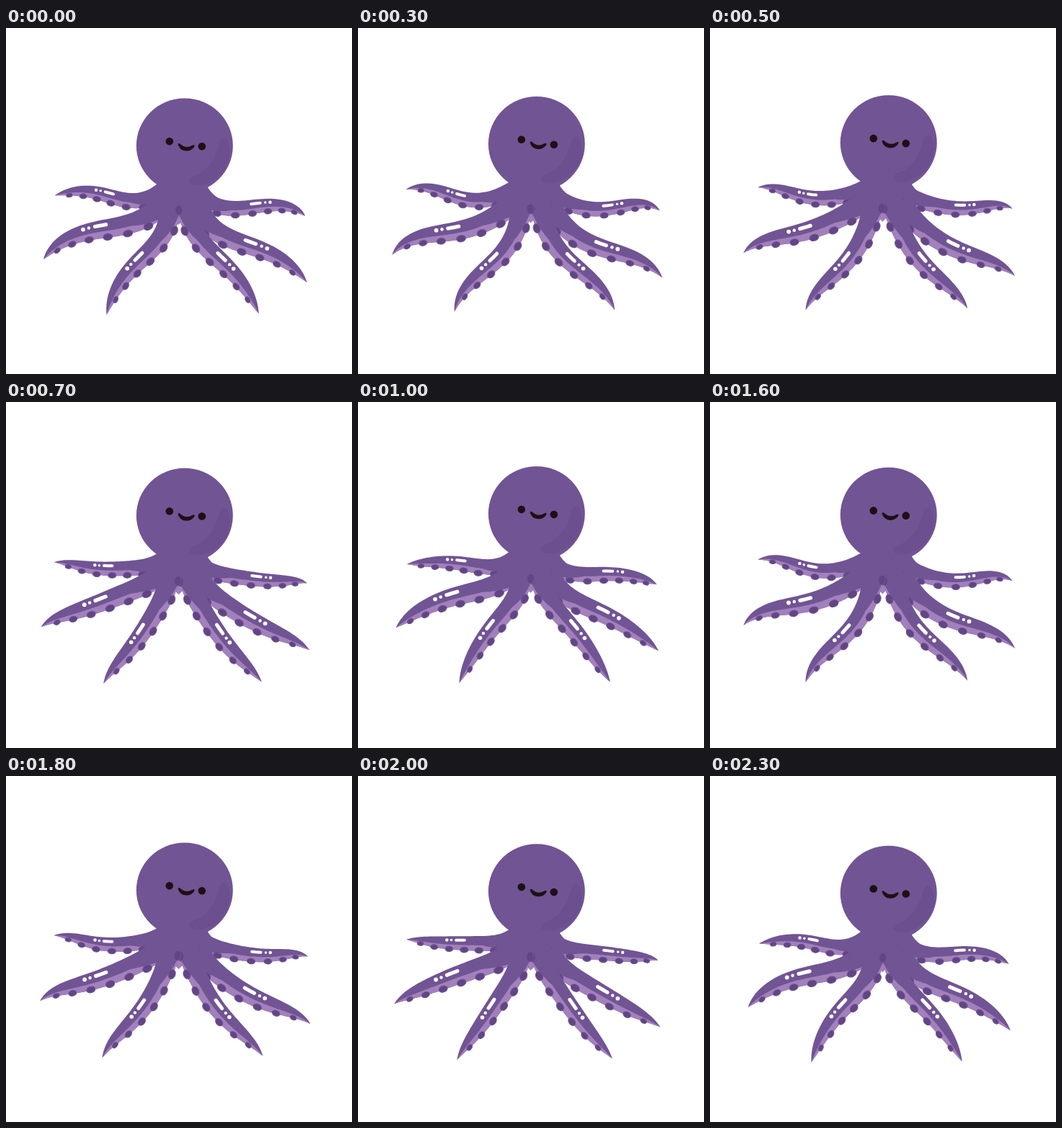
An HTML page that plays this animation: 480x480 px, repeating every 2400 ms.

```html
<!DOCTYPE html>
<html lang="en">
<head>
<meta charset="utf-8">
<title>Octopus</title>
<style>
  html, body { margin: 0; width: 100%; height: 100%; overflow: hidden; background: #fff; }
  svg { display: block; width: 100vw; height: 100vh; }
</style>
</head>
<body>
<svg viewBox="0 0 480 480">
  <g id="octopus">
    <path fill="#715494" d="M212 214Q204 228 188 231L212 260L240 244L268 262L304 240Q286 235 276 214Z"/>
    <path fill="#a280bb" d="M239.5 240L228 262L239.5 273L251 262Z"/>
    <g id="arms"></g>
    <ellipse cx="247.8" cy="163.3" rx="67" ry="65.8" fill="#715494"/>
    <path fill="#6b4f8e" d="M297 157Q302 150 306 155Q315 168 307 189Q296 212 270 218Q254 219 254 211Q256 206 269 202Q286 190 292 172Q295 166 297 157Z"/>
    <g fill="#1d1015">
      <circle cx="226.8" cy="157.3" r="5.3"/>
      <circle cx="271.8" cy="164.3" r="5.3"/>
      <path d="M238.5 161.5Q239.5 158.8 242 161Q249.5 168 258.5 162.8Q261.5 161 261.7 164Q257.5 171 249.5 170.6Q241 169.8 238.5 161.5Z"/>
    </g>
  </g>
</svg>
<script>
const LOOP = 2400, STEP = 100, WAVE = 1200;
const DARK = '#715494', LIGHT = '#a280bb', SUCKER = '#614584';

// Resting centre line at 0, 1/3, 2/3 and 1 of the length; back to front.
const arms = [
  { side: 1, width: 10, line: [[218, 225], [167, 238.5], [116, 231], [67, 229.3]] },
  { side: -1, width: 10, line: [[266, 230], [319, 250], [374.5, 249.5], [417, 258.3]] },
  { side: 1, width: 13, line: [[221, 238.5], [165, 273], [100, 291], [49.5, 319]] },
  { side: -1, width: 12.7, line: [[265, 243.5], [307, 290], [368, 318], [420, 351]] },
  { side: -1, width: 12.4, line: [[253, 240], [273.5, 298.5], [316, 347], [353.5, 395]] },
  { side: 1, width: 12.4, line: [[226, 240], [208.5, 298.5], [168.5, 346.5], [136.5, 397]] }
];

const octopus = document.getElementById('octopus');
const armLayer = document.getElementById('arms');
const range = (n, f) => Array.from({ length: n }, (_, i) => f(i));
const clamp = v => Math.max(0, Math.min(1, v));
const fmt = p => p.map(v => v.toFixed(2)).join(' ');
const poly = pts => 'M' + pts.map(fmt).join('L') + 'Z';

// Cubic through the four line points.
function along(line, s) {
  const t = 3 * s;
  const k = [
    -(t - 1) * (t - 2) * (t - 3) / 6,
    t * (t - 2) * (t - 3) / 2,
    -t * (t - 1) * (t - 3) / 2,
    t * (t - 1) * (t - 2) / 6
  ];
  return [0, 1].map(axis => line.reduce((sum, p, i) => sum + p[axis] * k[i], 0));
}

function frameOf(point, side, s) {
  const a = point(s - 0.01), b = point(s + 0.01);
  const dx = b[0] - a[0], dy = b[1] - a[1], len = Math.hypot(dx, dy);
  return { normal: [-dy / len * side, dx / len * side], angle: Math.atan2(dy, dx) * 180 / Math.PI };
}

// A wave that travels from the root to the tip.
function swell(s, time) {
  const lag = 4.9 + 11.7 * Math.max(0, s);
  return 4.3 * (1 - (1 - clamp(s)) ** 3) * Math.cos(2 * Math.PI * (time / WAVE - lag / 12));
}

function drawArm({ side, width, line }, time) {
  const rest = s => along(line, s);
  const centre = s => {
    const [x, y] = rest(s), { normal } = frameOf(rest, side, s), d = swell(s, time);
    return [x + normal[0] * d, y + normal[1] * d];
  };
  const half = s => width * (1 - s ** 4.5) * (1 + 0.2 * (1 - s) ** 4);
  // across: +1 is the upper edge, -1 the lower edge
  const at = (s, across) => {
    const [x, y] = centre(s), { normal } = frameOf(centre, side, s), d = across * half(s);
    return [x + normal[0] * d, y + normal[1] * d];
  };
  const steps = range(41, i => i / 40);
  const edge = across => steps.map(s => at(s, across(s)));
  const lower = edge(() => -1).reverse();
  const split = s => -0.25 - 0.75 * clamp((0.3 - s) / 0.22);

  const suckers = range(7, i => 0.86 - 0.133 * i).map(s => {
    const [x, y] = at(s, -0.92), w = half(s), { angle } = frameOf(centre, side, s);
    return `<ellipse rx="${2.8 + 0.28 * w}" ry="${1.6 + 0.23 * w}" fill="${SUCKER}" stroke="${DARK}"
      transform="translate(${fmt([x, y])}) rotate(${angle})"/>`;
  }).join('');

  const dot = (s, r) => {
    const [x, y] = at(s, 0.43);
    return `<circle cx="${x}" cy="${y}" r="${r * width / 12}" fill="#fff"/>`;
  };
  const dash = `<path d="M${[0.535, 0.495, 0.46].map(s => fmt(at(s, 0.43))).join('L')}"
    fill="none" stroke="#fff" stroke-width="${width * 0.4}" stroke-linecap="round"/>`;

  return `<path d="${poly([...edge(() => 1), ...lower])}" fill="${DARK}"/>
    <path d="${poly([...edge(split), ...lower])}" fill="${LIGHT}"/>
    ${suckers}${dot(0.617, 2.7)}${dot(0.577, 2.1)}${dash}`;
}

function render(time) {
  const lift = 10 * (1 - Math.abs(1 - 2 * time / LOOP));
  octopus.setAttribute('transform', `translate(0 ${-lift})`);
  armLayer.innerHTML = arms.map(arm => drawArm(arm, time)).join('');
}

const start = performance.now();
let shown = -1;
function tick() {
  const time = Math.floor((performance.now() - start) % LOOP / STEP) * STEP;
  if (time !== shown) render(shown = time);
  requestAnimationFrame(tick);
}
tick();
</script>
</body>
</html>
```
